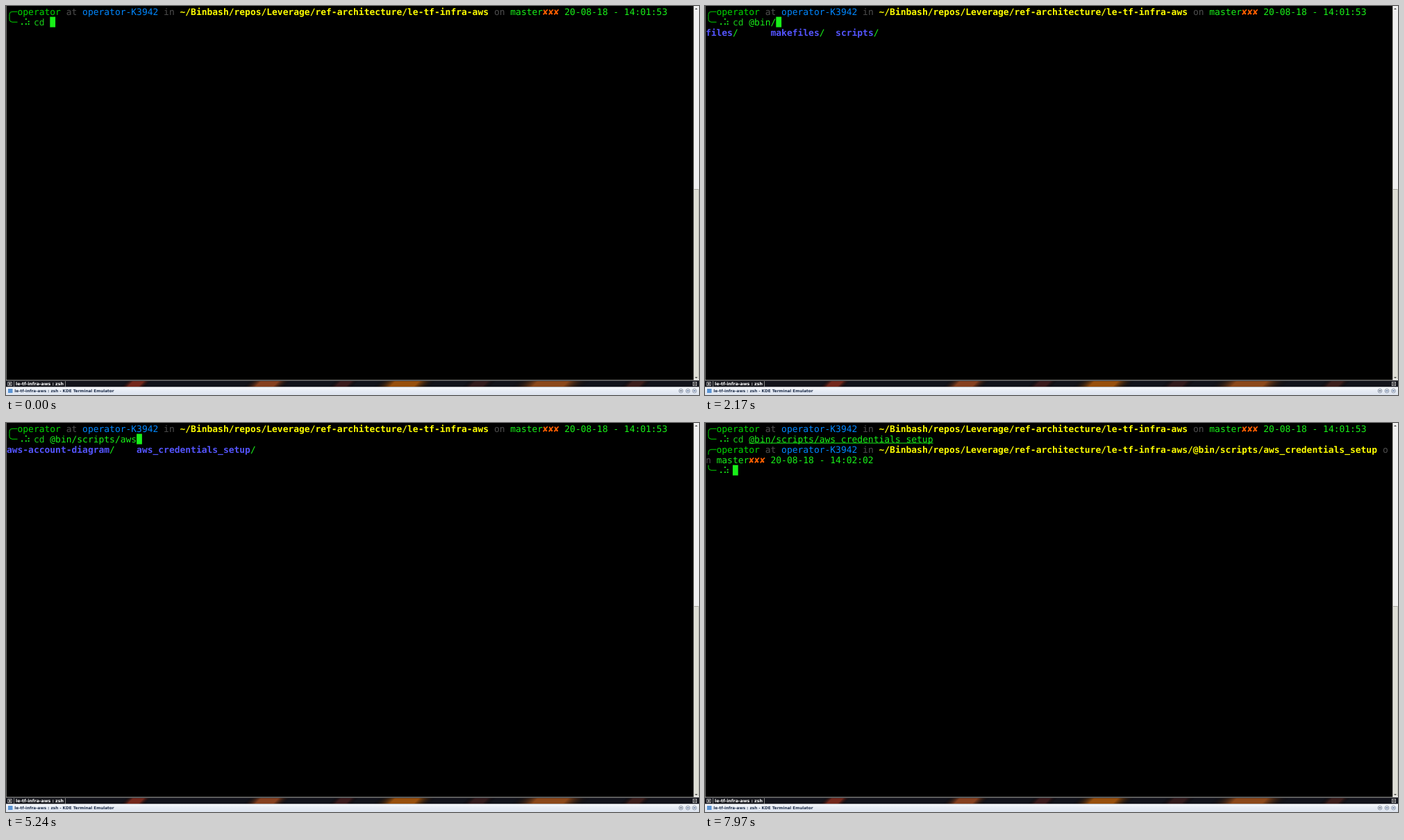
These frames come from a looping animation (998x561 px, 8000 ms). An HTML page with a canvas:

```html
<!DOCTYPE html>
<html lang="en">
<head>
<meta charset="utf-8">
<title>Terminal</title>
<style>
html, body { margin: 0; width: 100%; height: 100%; overflow: hidden; background: #000; }
canvas { display: block; }
</style>
</head>
<body>
<canvas id="stage" width="998" height="561"></canvas>
<script>
const ctx = document.getElementById('stage').getContext('2d');
const LOOP = 8000, CELL = 7.8, ROW = 15, LEFT = 0.9, TOP = 0.6;
const MONO = '12.96px "DejaVu Sans Mono", monospace';
const SANS = '"DejaVu Sans", sans-serif';
const C = {
  fg: '#18f018', user: '#00d700', dim: '#4e4e4e', host: '#0087ff', path: '#ffff00',
  dirty: '#ff5f00', dir: '#5454ff', cmd: '#18cc18', menu: '#0cfa0c'
};
const REPO = '~/Binbash/repos/Leverage/ref-architecture/le-tf-infra-aws';
const TARGET = '@bin/scripts/aws_credentials_setup';

const BIN = { names: ['files', 'makefiles', 'scripts'], step: 12, width: 10 };
const AWS = { names: ['aws-account-diagram', 'aws_credentials_setup'], step: 24, width: 22 };

// start time, typed argument, underlined, completion list, selected entry
const states = [
  [0, '', false],
  [600, ' ', false],
  [760, '@', true],
  [960, '@b', true],
  [1130, '@bi', true],
  [1300, '@bin', true],
  [1560, '@bin/', true],
  [1840, '@bin/', false, BIN],
  [2440, '@bin/files/', false, BIN, 0],
  [2700, '@bin/makefiles/', false, BIN, 1],
  [2970, '@bin/scripts/', false, BIN, 2],
  [3570, '@bin/scripts/', true],
  [3800, '@bin/scripts/a', true],
  [3970, '@bin/scripts/aw', true],
  [4170, '@bin/scripts/aws', true],
  [4800, '@bin/scripts/aws', false, AWS],
  [5500, '@bin/scripts/aws-account-diagram/', false, AWS, 0],
  [6100, TARGET + '/', false, AWS, 1],
  [7300, TARGET, true],
  [7720, TARGET, true, null, -1]
];

const colX = col => LEFT + col * CELL;
const rowY = row => TOP + row * ROW;

function rect(x, y, w, h, color) {
  ctx.fillStyle = color;
  ctx.fillRect(x, y, w, h);
}

function text(str, col, row, color, bold) {
  ctx.font = (bold ? 'bold ' : '') + MONO;
  ctx.fillStyle = color;
  ctx.fillText(str, colX(col), rowY(row) + 12);
  return col + str.length;
}

function block(col, row, width, color) {
  rect(colX(col), rowY(row), width * CELL, ROW, color);
}

function stroke(color, width, draw) {
  ctx.strokeStyle = color;
  ctx.lineWidth = width;
  ctx.beginPath();
  draw();
  ctx.stroke();
}

function corner(row, dir) {
  const y = rowY(row) + 7.6;
  stroke(C.user, 1, () => {
    ctx.moveTo(5, y + dir * 7.5);
    ctx.lineTo(5, y + dir * 4);
    ctx.quadraticCurveTo(5, y, 9, y);
    ctx.lineTo(16.5, y);
  });
}

function branch(col, row, time) {
  col = text('master', col, row, C.fg);
  for (let i = 0; i < 3; i++) col = text('✘', col, row, C.dirty);
  text('20-08-18 - ' + time, col + 1, row, C.fg);
}

function heading(row, path) {
  corner(row, 1);
  text('operator', 2, row, C.user);
  text('at', 11, row, C.dim);
  text('operator-K3942', 14, row, C.host);
  text('in', 29, row, C.dim);
  return text(path, 32, row, C.path, true) + 1;
}

function promptEnd(row) {
  corner(row, -1);
  ctx.font = '12.96px ' + SANS;
  ctx.fillStyle = C.fg;
  ctx.fillText('⠠⠵', colX(2), rowY(row) + 12);
}

function menu(list, selected) {
  list.names.forEach((name, i) => {
    const col = i * list.step;
    if (i === selected) {
      block(col, 2, list.width, C.menu);
      text(name.replace(/_/g, ' ') + '/', col, 2, '#000');
    } else {
      text('/', text(name, col, 2, C.dir, true), 2, C.fg);
    }
  });
}

function terminal(t) {
  const [, arg, underlined, list, selected] = states.findLast(s => s[0] <= t);
  const done = selected === -1;
  const onCol = heading(0, REPO);
  text('on', onCol, 0, C.dim);
  branch(onCol + 3, 0, '14:01:53');
  promptEnd(1);
  text('cd', 5, 1, C.cmd);
  // the next row hides the bottom of underscores
  const end = text(arg.replace(/_/g, ' '), 8, 1, C.fg);
  if (underlined) rect(colX(8), 28.5, arg.length * CELL, 1, C.fg);
  if (list) menu(list, selected);
  if (!done) {
    block(end, 1, 1, C.fg);
    return;
  }
  text('o', heading(2, REPO + '/' + TARGET), 2, C.dim);
  text('n', 0, 3, C.dim);
  branch(2, 3, '14:02:02');
  promptEnd(4);
  block(5, 4, 1, C.fg);
}

function scrollbar() {
  rect(990, 0, 8, 540, '#f1f1f1');
  rect(990, 0, 1, 540, '#b4b4b0');
  rect(991, 264, 6, 274, '#deded6');
  rect(991, 264, 6, 1, '#a8a8a0');
  rect(997, 264, 1, 274, '#c4c4bc');
  ctx.fillStyle = '#444';
  for (const [y, d] of [[4, -1], [536, 1]]) {
    ctx.beginPath();
    ctx.moveTo(992, y - d);
    ctx.lineTo(996, y - d);
    ctx.lineTo(994, y + d);
    ctx.fill();
  }
}

function glow(x, width, color) {
  const g = ctx.createLinearGradient(x, 0, x + width, 0);
  g.addColorStop(0, 'transparent');
  g.addColorStop(0.3, color);
  g.addColorStop(0.7, color);
  g.addColorStop(1, 'transparent');
  ctx.save();
  ctx.transform(1, 0, -1, 1, 545, 0);
  rect(x, 541, width, 8, g);
  ctx.restore();
}

function label(str, x, y, size, color) {
  ctx.font = `bold ${size}px ${SANS}`;
  ctx.fillStyle = color;
  ctx.fillText(str, x, y);
}

function tabButton(x, plus) {
  rect(x - 3, 542, 6, 6, '#e0e0e0');
  rect(x - 2.3, 542.7, 4.6, 4.6, '#1c1c20');
  rect(x - 1.5, 544.6, 3, 0.9, '#fff');
  if (plus) rect(x - 0.45, 543.5, 0.9, 3, '#fff');
}

function tabBar() {
  rect(0, 540, 998, 10, '#12131b');
  glow(168, 38, '#74281c');
  glow(345, 62, '#86401f');
  glow(468, 36, '#3a1a1c');
  glow(532, 84, '#984f0c');
  glow(660, 42, '#321a1c');
  glow(730, 108, '#8c481a');
  glow(888, 38, '#3c1e1c');
  rect(0, 539.3, 998, 1, '#aaaaa6');
  rect(11, 541, 76, 8, '#15161c');
  rect(11, 541, 0.8, 8, '#a0a0a0');
  rect(85, 541, 0.8, 8, '#a0a0a0');
  tabButton(5.5, true);
  tabButton(992, false);
  label('le-tf-infra-aws : zsh', 14, 547.2, 6.27, '#fff');
}

function titleBar() {
  const g = ctx.createLinearGradient(0, 549, 0, 561);
  g.addColorStop(0, '#fbfcfe');
  g.addColorStop(0.5, '#e6ebf4');
  g.addColorStop(1, '#dce3ee');
  rect(0, 549.3, 998, 11.7, g);
  rect(3, 552, 6.5, 6, '#5a94d4');
  label('le-tf-infra-aws : zsh - KDE Terminal Emulator', 12.3, 557.2, 5.72, '#20304c');
  [972, 982, 991.5].forEach((x, i) => {
    stroke('#7c8698', 0.8, () => ctx.arc(x, 555, 2.9, 0, 7));
    rect(x - 1.4, 554.4, 2.8, 1.2, i === 0 ? '#303a4c' : '#3c5884');
  });
}

function frame(now) {
  ctx.textRendering = 'geometricPrecision';
  rect(0, 0, 998, 561, '#000');
  terminal(now % LOOP);
  rect(0, 0, 1, 540, '#6e6e6a');
  scrollbar();
  tabBar();
  titleBar();
}

function tick() {
  frame(performance.now());
  requestAnimationFrame(tick);
}
tick();
</script>
</body>
</html>
```
